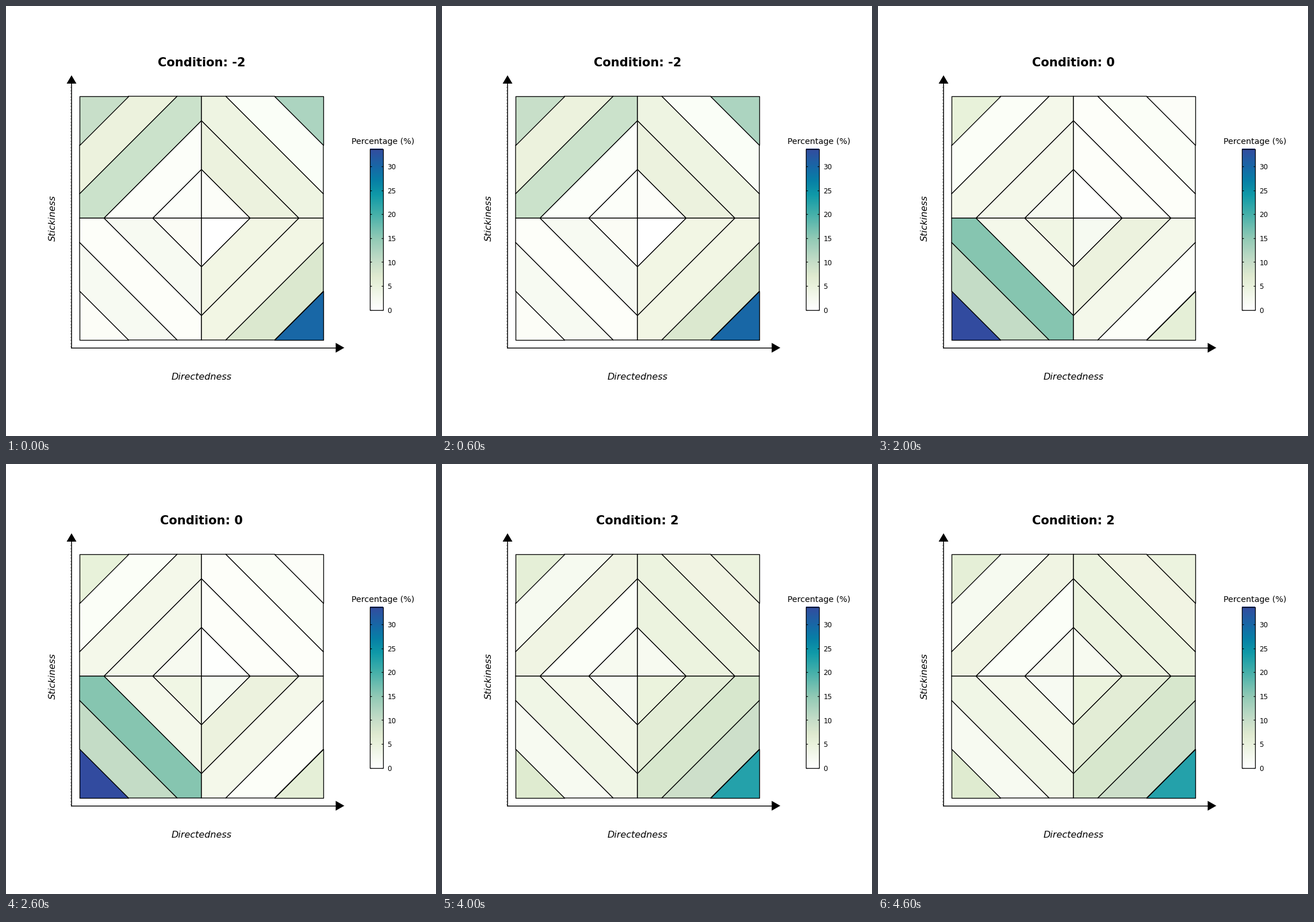
Animation, 748 px wide and 748 px high, one loop 5000 ms. Source, as a matplotlib script:

```python
import matplotlib.pyplot as plt
import numpy as np
from matplotlib.animation import FuncAnimation
from matplotlib.colors import LinearSegmentedColormap
from matplotlib.patches import Polygon, Rectangle

SIZE, DPI = 748, 64
PT = 72 / DPI  # points per pixel
CX, CY, HALF = 340, 369, 212
TOP, BOTTOM, STEP = 248.5, 528.5, 8.32
VMAX = (BOTTOM - TOP) / STEP
QUADRANTS = [(-1, -1), (1, -1), (-1, 1), (1, 1)]

# One line per quadrant, bands listed from the centre outwards.
FILLS = {
    -2: """fcfef9 fcfef9 cbe2cb ecf2dd c8dfc9
           fcfdf8 ecf2de eef4e2 fafef7 acd4c0
           fbfcf5 f7faf2 fdfef9 f7faf2 fcfdf7
           ffffff f2f6e4 f2f6e4 dbe8cf 1867a6""",
    -1: """f7faf0 f5f8eb f5f8eb eef4e2 d6e6cd
           f7faf0 fcfef8 eef4e2 fbfef7 fcfdf8
           ffffff e9f2de e9f2de e9f2de ccdeca
           f7faf0 d5e6cd e5edd4 d5e6cd 22a0aa""",
    0: """f7faf0 f4f8ea f4f8ea fbfef7 e8f2da
          fefffd fdfef9 fdfef9 fbfef7 fcfdf8
          f0f6e4 f4f8ea 86c5b0 c4dcc6 324b9f
          f6faf1 ecf2de f4f8ea fcfef8 e5efd7""",
    1: """f7faf0 eef4e0 eff3e2 e8f2da eef4e0
          fbfef7 ffffff ffffff ffffff f7faf0
          ffffff eef4e0 50b3ac c3dcc7 c6dcc8
          eff6e5 e3ecd4 b2d5c2 e4eed4 dfead0""",
    2: """f7faf0 fbfef7 f0f4e3 f6faf0 e5efd7
          f7faf0 ecf3df ecf3df f1f4e3 ecf3df
          f7faf2 f4f8ea f0f6e6 f7faf1 dfebd0
          ebf3dd e3edd6 d7e7cd cddfca 24a1aa""",
}
CONDITIONS = list(FILLS)

SCALE = [(0, "#ffffff"), (5, "#e9f2dc"), (7, "#dfead0"), (10, "#c5ddc8"),
         (15, "#90c9b5"), (20, "#45b0aa"), (24, "#109aa8"),
         (27, "#0780a6"), (30, "#1867a6"), (VMAX, "#334c9f")]

plt.rcParams["font.family"] = "DejaVu Sans"
fig = plt.figure(figsize=(SIZE / DPI, SIZE / DPI), dpi=DPI, facecolor="white")
ax = fig.add_axes([0, 0, 1, 1])


def line(xs, ys, width=1.4):
    ax.plot(xs, ys, color="black", lw=width * PT, solid_capstyle="butt")


def label(x, y, text, size, **style):
    style = {"ha": "center", "va": "baseline", **style}
    return ax.text(x, y, text, fontsize=size * PT, color="black", **style)


def band(lo, hi):
    """Part of the unit square where lo <= u + v <= hi."""
    a, b = ((min(s, 1), max(s - 1, 0)) for s in (lo, hi))
    side = [a, (1, 0), b] if lo < 1 < hi else [a, b]
    return np.array(side + [(v, u) for u, v in reversed(side)])


def draw_cells():
    cells = []
    for quadrant in QUADRANTS:
        for k in range(5):
            points = (CX, CY) + HALF * band(0.4 * k, 0.4 * (k + 1)) * quadrant
            cells.append(ax.add_patch(Polygon(
                points, edgecolor="black", lw=1.35 * PT, joinstyle="round")))
    return cells


def draw_axes():
    line([114, 114], [595.2, 130], 1.5)
    line([113.3, 578], [594.5, 594.5], 1.5)
    ax.add_patch(Polygon([(114, 120.5), (105.5, 135), (122.5, 135)], fc="black", lw=0))
    ax.add_patch(Polygon([(588.5, 594.5), (573.5, 586), (573.5, 603)], fc="black", lw=0))
    for y in np.arange(141, 594, 5.5):
        line([112.2, 113.5], [y, y], 1)
    label(CX, 649.5, "Directedness", 16, style="italic")
    label(88.5, CY, "Stickiness", 16, style="italic", rotation=90,
          ha="right", va="center")


def draw_colorbar():
    left, right = 633.5, 656.5
    cmap = LinearSegmentedColormap.from_list(
        "percentage", [(v / VMAX, c) for v, c in SCALE], N=512)
    ax.imshow(np.linspace(1, 0, 280)[:, None], cmap=cmap, aspect="auto",
              extent=(left, right, BOTTOM, TOP), interpolation="nearest")
    ax.add_patch(Rectangle((left, TOP), right - left, BOTTOM - TOP,
                           fill=False, ec="black", lw=1.3 * PT))
    for value in range(0, 31, 5):
        y = BOTTOM - STEP * value
        line([left, left + 3], [y, y], 1.2)
        line([right - 3, right], [y, y], 1.2)
        label(663.3, y + 0.2, str(value), 12, ha="left", va="center_baseline")
    label(656, 240.3, "Percentage (%)", 14.2)


cells = draw_cells()
draw_axes()
draw_colorbar()
title = label(CX, 105, "", 21, weight="bold")
ax.set(xlim=(0, SIZE), ylim=(SIZE, 0))
ax.axis("off")


def update(i):
    condition = CONDITIONS[i]
    title.set_text(f"Condition: {condition}")
    for cell, fill in zip(cells, FILLS[condition].split()):
        cell.set_facecolor("#" + fill)
    return [title, *cells]


anim = FuncAnimation(fig, update, frames=len(CONDITIONS), interval=1000,
                     repeat=True, repeat_delay=0, blit=False)
plt.show()
```
